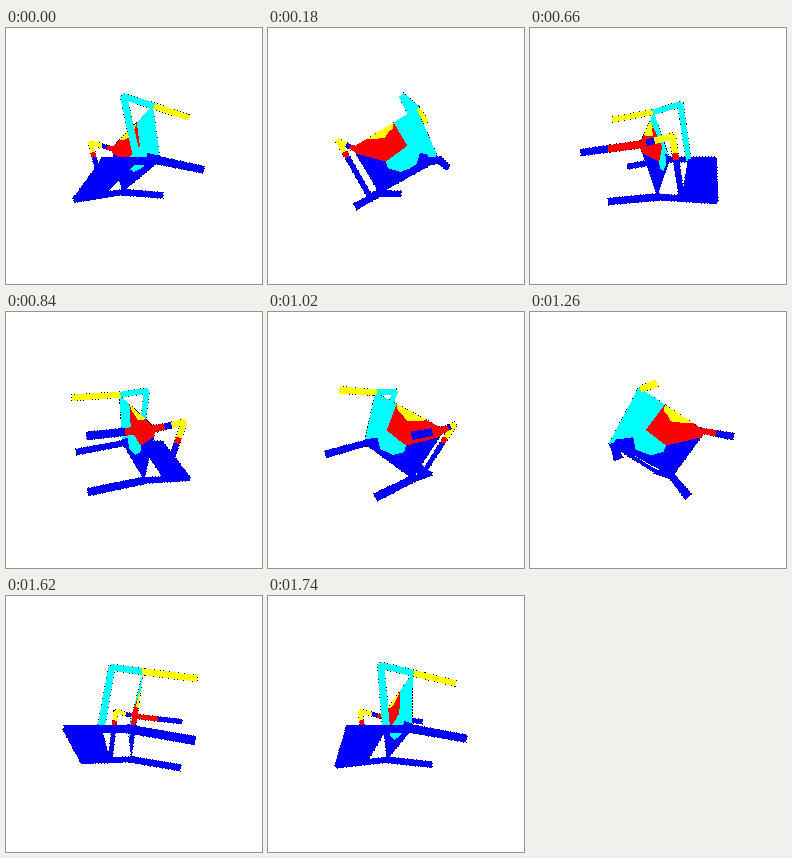
An HTML page that plays this animation: 256x256 px, repeating every 1800 ms.

```html
<!DOCTYPE html>
<html lang="en">
<head>
<meta charset="utf-8">
<title>Rotating chair</title>
<style>
  html, body { margin: 0; width: 100%; height: 100%; overflow: hidden; background: #fff; }
  svg { display: block; width: 100%; height: 100%; }
</style>
</head>
<body>
<svg id="stage" viewBox="0 0 256 256" shape-rendering="crispEdges"></svg>
<script>
const CYAN = '#0ff', BLUE = '#00f', RED = '#f00', YELLOW = '#ff0';
const DEPTH = 230, STEP = 60, STEPS = 30, FACING = 252, SAG = 4;

const mix = (a, b, t) => a.map((v, i) => v + (b[i] - v) * t);

// Seat corners, then feet, arm corners and the top of the backrest
const A = [-15.5, -48, 14], B = [50, -9, -12], C = [15, 38, -8], D = [-43, 4, 9];
const footA = [-2, -41.5, 60], footB = [61.5, -3, 39.5], footC = [24, 45.5, 42], footD = [-29.5, 13, 59.5];
const armA = [-18.8, -53.5, -16], armB = [43, -15, -37.5];
const topC = [-3, 39.5, -57.5], topD = [-56, 4, -41.5];
const armC = mix(C, topC, .43), armD = mix(D, topD, .43);

// The seat dips towards the backrest side in its middle
const seat = (...uv) => uv.map(([u, v]) => {
  const [x, y, z] = mix(mix(A, B, u), mix(D, C, u), v);
  return [x, y, z - SAG * 16 * u * (1 - u) * v * (1 - v)];
});
const face = (color, pts) => ({ color, pts });
const bar = (color, a, b, width = 6) => ({ color, pts: [a, b], width });
const part = (color, a, b, from, to, width) => bar(color, mix(a, b, from), mix(a, b, to), width);

const legs = [
  bar(YELLOW, A, footA),
  part(RED, B, footB, 0, .5), part(BLUE, B, footB, .5, 1),
  bar(BLUE, C, footC, 7), bar(BLUE, D, footD, 7)
];

const panel = [
  face(BLUE, [A, B, C, D]),
  face(CYAN, seat([0, 0], [.34, 0], [.37, .07], [.29, .53], [.65, .58], [.67, .7],
    [.54, .86], [.31, .9], [.19, .74], [.02, .9], [0, .9])),
  face(RED, seat([.34, 0], [1, 0], [1, .14], [.95, .2], [.65, .58], [.29, .53])),
  face(YELLOW, seat([.34, 0], [.77, 0], [.67, .09], [.52, .18], [.44, .12], [.37, .1]))
];

const back = [
  face(BLUE, [mix(D, topD, .42), topD, topC, mix(C, topC, .42)]),
  bar(BLUE, D, topD), bar(BLUE, C, topC), bar(BLUE, topD, topC, 4),
  bar(CYAN, A, armA), bar(CYAN, armA, armD),
  part(RED, B, armB, 0, .25, 5), part(BLUE, B, armB, .25, .5, 5), part(YELLOW, B, armB, .5, 1, 5),
  part(YELLOW, armB, armC, 0, .22, 5), part(RED, armB, armC, .22, .32, 5),
  part(BLUE, armB, armC, .32, 1, 5)
];

function project([x, y, z], angle) {
  const c = Math.cos(angle), s = Math.sin(angle);
  const near = z * c - x * s, scale = DEPTH / (DEPTH - near);
  return { x: 128 + (x * c + z * s) * scale, y: 128 + y * scale, z: near, scale };
}

// Turns a bar into a ribbon that faces the viewer
function ribbon([a, b], width) {
  const dx = b.x - a.x, dy = b.y - a.y, len = Math.hypot(dx, dy) || 1;
  const ux = dx / len, uy = dy / len;
  const corner = (p, end, side) => {
    const h = width / 2 * p.scale;
    return { x: p.x + h * (ux * end * .4 - uy * side), y: p.y + h * (uy * end * .4 + ux * side) };
  };
  return [corner(a, -1, 1), corner(b, 1, 1), corner(b, 1, -1), corner(a, -1, -1)];
}

function shape({ color, pts, width }, angle) {
  const flat = pts.map(p => project(p, angle));
  const outline = width ? ribbon(flat, width) : flat;
  return {
    color,
    z: flat.reduce((sum, p) => sum + p.z, 0) / flat.length,
    path: outline.map(p => p.x.toFixed(2) + ',' + p.y.toFixed(2)).join(' ')
  };
}

function legsInFront(angle) {
  const [a, b, c] = [A, B, C].map(p => project(p, angle));
  return (b.x - a.x) * (c.y - a.y) > (b.y - a.y) * (c.x - a.x);
}

function draw(step) {
  const angle = (step * 360 / STEPS - FACING) * Math.PI / 180;
  const build = list => list.map(p => shape(p, angle));
  const sorted = list => build(list).sort((p, q) => p.z - q.z);
  const groups = [sorted(back), build(panel), sorted(legs)];
  if (!legsInFront(angle)) groups.reverse();
  const shapes = groups.flat();
  const edges = shapes.map(s => `<polygon points="${s.path}"/>`).join('');
  const fills = shapes.map(s => `<polygon points="${s.path}" fill="${s.color}"/>`).join('');
  stage.innerHTML =
    `<g fill="none" stroke="#000" stroke-dasharray="1 2">${edges}</g>${fills}`;
}

const stage = document.getElementById('stage');
const start = performance.now();
let shown = -1;

function tick() {
  const step = Math.floor((performance.now() - start) / STEP) % STEPS;
  if (step !== shown) draw(shown = step);
  requestAnimationFrame(tick);
}
tick();
</script>
</body>
</html>
```
